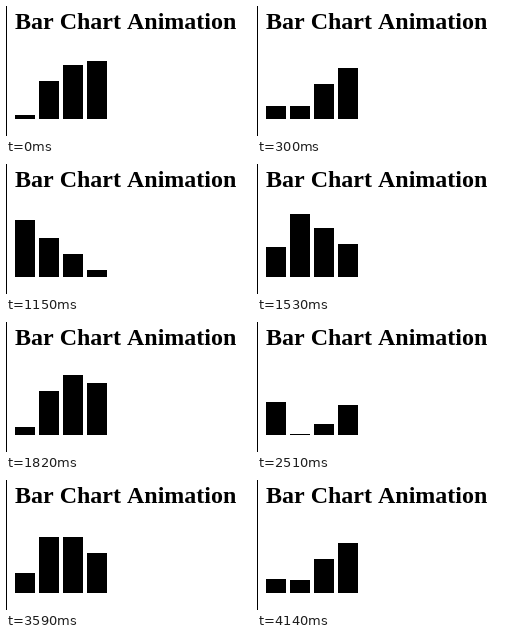
Recreate the animation shown at these times as an HTML page. Size 245x130 px, loop 4.24 s.

```html
<!DOCTYPE html>
<html lang="en">
<head>
<meta charset="utf-8">
<title>Bar Chart Animation</title>
<style>
  html, body { margin: 0; width: 100%; height: 100%; overflow: hidden; background: #fff; }
  svg { display: block; width: 100%; height: 100%; }
  text { font: bold 24px "Liberation Serif", "Times New Roman", serif; font-kerning: none; }
  rect { shape-rendering: crispEdges; }
</style>
</head>
<body>
<svg viewBox="0 0 245 130">
  <rect width="1" height="130"/>
  <text x="9" y="23">Bar Chart Animation</text>
  <g id="bars"></g>
</svg>
<script>
const LOOP = 4240, STEPS = 44, LEAD = 12;
const BASE = 113, CYCLE = 128, START = 122, ADVANCE = 6.42;
const LAGS = [0, 32, 48, 64];

const group = document.getElementById("bars");
const bars = LAGS.map((_, i) => {
  const bar = document.createElementNS(group.namespaceURI, "rect");
  bar.setAttribute("x", 9 + 24 * i);
  bar.setAttribute("width", 20);
  return group.appendChild(bar);
});

// Linear rise and fall; the fall drops faster near the end, then slows down
function barHeight(pos) {
  const left = CYCLE - pos;
  const tail = Math.max(0.7 * left, 14 + (left - 20) * 10 / 7);
  return Math.round(Math.min(pos, left, tail));
}

function draw(ms) {
  const step = Math.floor((ms + LEAD) / LOOP * STEPS) % STEPS;
  const pos = START + ADVANCE * step;
  bars.forEach((bar, i) => {
    const height = barHeight((pos - LAGS[i]) % CYCLE);
    bar.setAttribute("y", BASE - height);
    bar.setAttribute("height", height);
  });
}

const origin = performance.now();
function tick() {
  draw((performance.now() - origin) % LOOP);
  requestAnimationFrame(tick);
}
tick();
</script>
</body>
</html>
```
